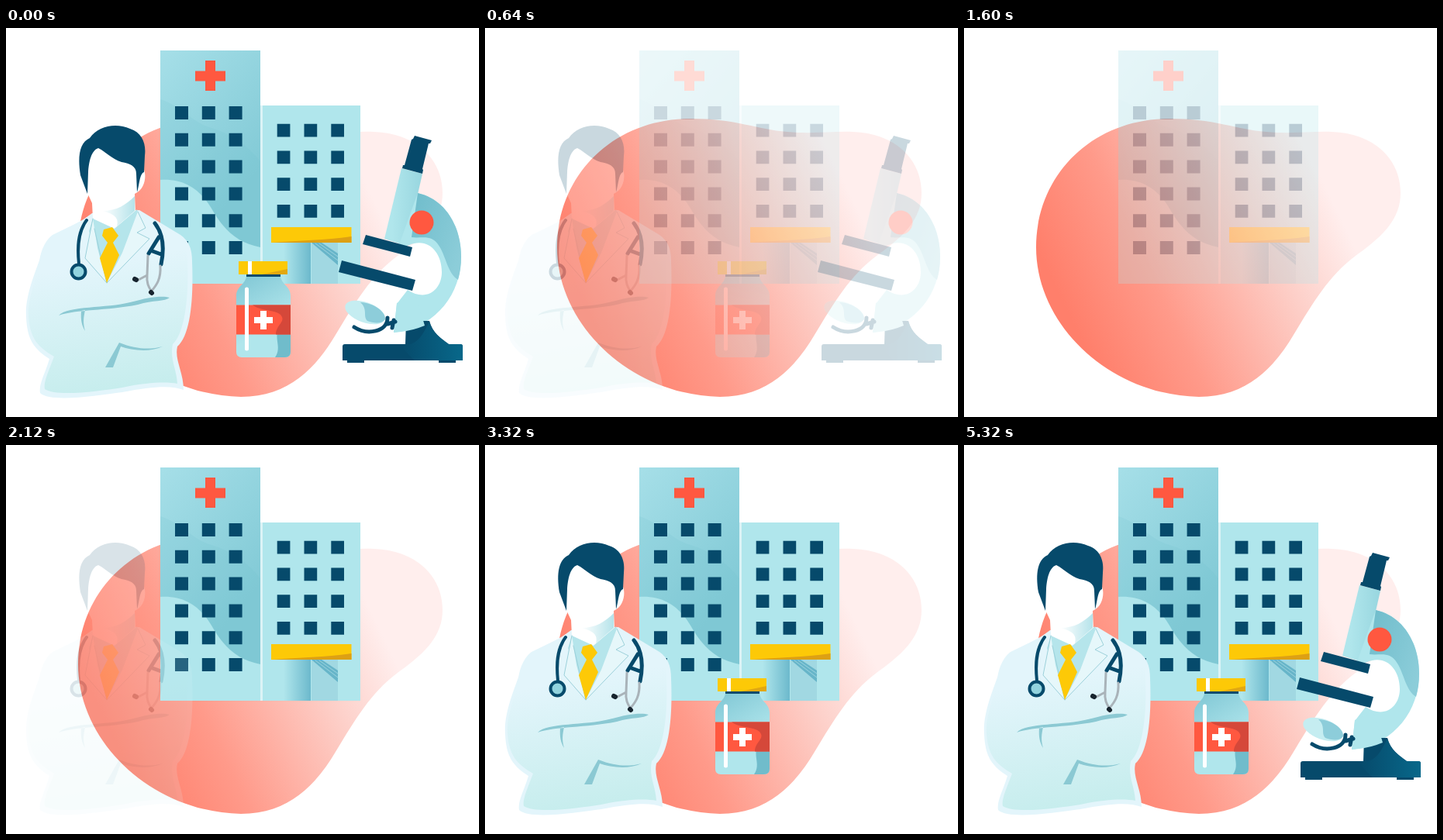
Write an HTML page that moves like this. It is 610 px wide and 502 px high and loops after 5760 ms.

```html
<!DOCTYPE html>
<html lang="en">
<head>
<meta charset="utf-8">
<title>Hospital scene</title>
<style>
html, body { margin: 0; width: 100%; height: 100%; overflow: hidden; background: #fff; }
svg { display: block; width: 100%; height: 100%; }
.navy { fill: #064a6b; }
.red { fill: #ff5840; }
.pale { fill: #b0e6ec; }
.line { fill: none; stroke-linecap: round; stroke-linejoin: round; }
</style>
</head>
<body>
<svg viewBox="0 0 610 502">
  <defs>
    <linearGradient id="blob" gradientUnits="userSpaceOnUse" x1="150" y1="400" x2="500" y2="230">
      <stop offset="0" stop-color="#ff7f6b"/><stop offset=".3" stop-color="#ff9a8a"/>
      <stop offset=".7" stop-color="#fdcfc8"/><stop offset=".95" stop-color="#ffeeed"/>
    </linearGradient>
    <linearGradient id="tower" x1="0" y1="0" x2=".5" y2="1">
      <stop offset="0" stop-color="#a6dfe8"/><stop offset=".8" stop-color="#82cad6"/>
    </linearGradient>
    <linearGradient id="door">
      <stop offset="0" stop-color="#b0e6ec"/><stop offset="1" stop-color="#6cb9cc"/>
    </linearGradient>
    <linearGradient id="coat" x1=".3" y1="0" x2=".45" y2="1">
      <stop offset=".3" stop-color="#e3f5fb"/><stop offset="1" stop-color="#c6eded"/>
    </linearGradient>
    <linearGradient id="neck">
      <stop offset="0" stop-color="#fff"/><stop offset="1" stop-color="#b5e3ea"/>
    </linearGradient>
    <linearGradient id="glass" x1="0" y1="0" x2=".4" y2="1">
      <stop offset="0" stop-color="#7fc6d4"/><stop offset=".75" stop-color="#b0e6ec"/>
    </linearGradient>
    <linearGradient id="arm" x1="0" y1="0" x2="1" y2=".7">
      <stop offset="0" stop-color="#6fbccb"/><stop offset="1" stop-color="#8ccdd9"/>
    </linearGradient>
    <linearGradient id="tube" x1="0" y1="0" x2="1" y2="0">
      <stop offset=".2" stop-color="#b0e6ec"/><stop offset="1" stop-color="#98d6df"/>
    </linearGradient>
    <linearGradient id="foot">
      <stop offset="0" stop-color="#064a6b"/><stop offset="1" stop-color="#08688a"/>
    </linearGradient>
  </defs>

  <path fill="url(#blob)" d="M93 283C93 190 165 117 265 117C325 117 350 131 390 134C425 137 445 133 475 134C530 136 563 170 563 213C563 250 535 272 505 294C470 320 450 355 425 396C400 438 365 476 303 476C190 474 93 385 93 283Z"/>

  <g id="hospital">
    <path fill="url(#tower)" d="M199 29H328V330H199Z"/>
    <path fill="#6bbccb" opacity=".15" d="M199 92C225 100 238 120 262 128C290 136 310 150 328 172V284H199Z"/>
    <path class="pale" d="M199 196C235 194 254 213 268 238C284 264 300 277 328 283V330H199Z"/>
    <path fill="#dcf3f6" d="M328 100H331V330H328Z"/>
    <path class="pale" d="M331 100H457V330H331Z"/>
    <path class="red" d="M257 42h13v13.5h13v13h-13V81h-13V68.500h-13v-13h13Z"/>
    <path id="windows" class="navy"/>
    <path fill="url(#door)" d="M358 277H393V330H358Z"/>
    <path fill="#a1d8e2" d="M394 277H428V330H394Z"/>
    <path fill="#67b5c9" d="M394 277H407L428 291V306Z"/>
    <path class="line" stroke="#9bd3df" d="M399 278L428 300M404 278L428 295"/>
    <path fill="#fdc907" d="M342 257H445.500V277H342Z"/>
    <path fill="#dda014" d="M342 277C380 274 410 274 445.500 269V277Z"/>
  </g>

  <g id="doctor">
    <path fill="#e3f5fb" d="M111 239L97 249L60 267Q47 277 43 300C31 332 25 352 26 372C27 402 36 414 56 427C50 447 42 460 44 471C58 484 118 474 150 470C190 462 214 461 229 467C229 444 217 428 221 411C238 396 242 350 240 301C240 284 235 274 225 267L172 235Z"/>
    <path fill="url(#coat)" d="M111 241L62 268Q49 278 45 302C34 334 28 354 29 372C31 400 40 411 62 424C55 443 48 457 50 466C65 476 118 469 150 464C188 456 209 457 221 459C220 440 211 427 215 408C230 394 236 350 234 302C234 286 230 276 222 268L172 236Z"/>
    <path fill="#fff" d="M106 160L105 213L111 226L112 246L138 260L167 238L166 214C180 208 181 190 178 183L165 150Z"/>
    <path fill="url(#neck)" d="M124 236C143 236 155 228 166 217V236L143 256C146 245 140 240 124 236Z"/>
    <path fill="#b5e5eb" d="M112 246L140 259L169 234L172 252L130 328L107 262Z"/>
    <path fill="#e6f7fa" d="M112 246L102 297L130 329L118 284ZM170 237L182 258L170 263L185 272L130 329L150 290Z"/>
    <path class="line" stroke="#9bd0da" d="M112 246L102 297L130 329L185 272L169 264L180 258L170 237M130 329L114 259"/>
    <path fill="#fdc907" d="M126 260L137 257L145 268L138 277L146 293L130 329L121 297L131 277L124 268Z"/>
    <path class="navy" d="M105 214L96 190C92 165 95 148 108 142C119 126 142 122 160 130C176 135 181 150 179 165L178 186C172 188 172 204 169 212L168 188C168 178 160 175 149 173C136 169 128 159 119 155C110 158 107 172 106 186Z"/>
    <g class="line" stroke="#064a6b" stroke-width="4">
      <path d="M104 248C92 264 92 285 94 304"/>
      <circle cx="93.500" cy="314.500" r="9" fill="#91d3de"/>
      <path stroke-width="5" d="M192 252C203 266 204 286 200 305M197 270L184 291M189 288L200 292"/>
    </g>
    <path class="line" stroke="#a9b3b9" stroke-width="3" d="M183 294L182 319L169 326M182 319C181 329 184 334 187 339M199 307C200 324 194 332 188 339"/>
    <path class="line" stroke="#17242e" stroke-width="6" d="M166 324l2 1M187 341l1 1"/>
    <path fill="#8bc9d3" d="M68 371C80 358 130 362 160 354C185 347 202 345 211 348C205 353 190 351 170 357C130 365 90 363 68 371ZM97 365C96 378 98 384 102 391C99 380 100 374 102 364ZM128 438L146 406C168 415 187 415 202 411C185 419 162 416 148 411L138 438Z"/>
  </g>

  <g id="bottle">
    <path fill="url(#glass)" d="M310 320C309 331 297 333 297 346V418Q297 425 304 425H360Q367 425 367 418V346C367 333 355 331 354 320Z"/>
    <path fill="#70bccb" d="M347 425C357 412 343 397 354 387L367 376V418Q367 425 360 425Z"/>
    <path class="red" d="M297 357.500H367V395.500H297Z"/>
    <path fill="#d5483a" d="M318 357.500H367V395.500H348C348 383 362 379 354 370C346 363 330 366 318 357.500Z"/>
    <path fill="#fff" d="M328 365h8v8h8v8h-8v8h-8v-8h-8v-8h8Z"/>
    <path class="line" stroke="#fff" stroke-width="5" d="M310.500 337V414"/>
    <path class="navy" d="M310 317H354V321H310Z"/>
    <path fill="#fdc907" d="M300 301H363V318H300Z"/>
    <path fill="#e2a812" d="M330 318L363 311V318Z"/>
    <path fill="#fff" d="M312 301H317V318H312Z"/>
  </g>

  <g id="microscope">
    <path fill="url(#tube)" d="M510 181L537 188L516 281L488 272Z"/>
    <path class="pale" d="M531 213C570 222 587 260 587 295C587 346 551 388 500 393L504 356L518 338C542 354 562 338 562 315C562 290 545 270 520 280L505 285Z"/>
    <path fill="url(#arm)" d="M531 213C570 222 587 260 587 295Q587 311 583 325C570 317 568 297 559 282C549 265 537 272 523 270Z"/>
    <circle class="red" cx="536" cy="251" r="15.500"/>
    <path class="navy" d="M527 139L549 145L547 149L545 149L537 182L538 183L537 188L511 181L512 177L514 177L523 144L525 143ZM464 267L524 283L521 295L460 279ZM433 300L528 325L524 339L429 315Z"/>
    <path class="navy" d="M516 378H546C550 393 560 400 571 408H586Q589 408 589 411V429H580V432H558V429H462V432H440V429H434V411Q434 408 437 408H515Z"/>
    <path fill="url(#foot)" d="M546 379C550 393 560 400 571 408H586Q589 408 589 411V429H527C520 422 513 416 509 408H522C535 403 539 392 546 379Z"/>
    <path class="pale" d="M504 355L528 344L540 384Q521 392 500 393Z"/>
    <path class="line" stroke="#064a6b" stroke-width="5" d="M449 386C466 397 492 392 492 374M492 382L502 379M500 377L498 387"/>
    <ellipse cx="463" cy="367" rx="27" ry="13" transform="rotate(20 463 367)" fill="#c5edf1"/>
    <path fill="#8dcdda" d="M457 354C475 355 490 366 489 376C485 382 474 381 466 378C460 372 467 363 457 354Z"/>
  </g>
</svg>
<script>
const LOOP = 5760, FADE_OUT = 920, FADE_IN = 800;
const starts = { hospital: 1320, doctor: 1920, bottle: 2520, microscope: 3360 };
const layers = Object.keys(starts).map(id => [document.getElementById(id), starts[id]]);

const grid = (x, y, rows, size) => {
  let d = '';
  for (let r = 0; r < rows; r++)
    for (let c = 0; c < 3; c++)
      d += `M${x + c * 34.8} ${y + r * 34.8}h${size}v${size}h${-size}Z`;
  return d;
};
document.getElementById('windows').setAttribute('d', grid(218, 101, 6, 17) + grid(349.7, 123.7, 4, 16.7));

const ease = t => (1 - Math.cos(Math.PI * Math.min(1, Math.max(0, t)))) / 2;

function draw(now) {
  const t = now % LOOP;
  for (const [layer, start] of layers)
    layer.style.opacity = t < 1000 ? 1 - ease(t / FADE_OUT) : ease((t - start) / FADE_IN);
}

const begin = performance.now();
function tick() {
  draw(performance.now() - begin);
  requestAnimationFrame(tick);
}
tick();
</script>
</body>
</html>
```
